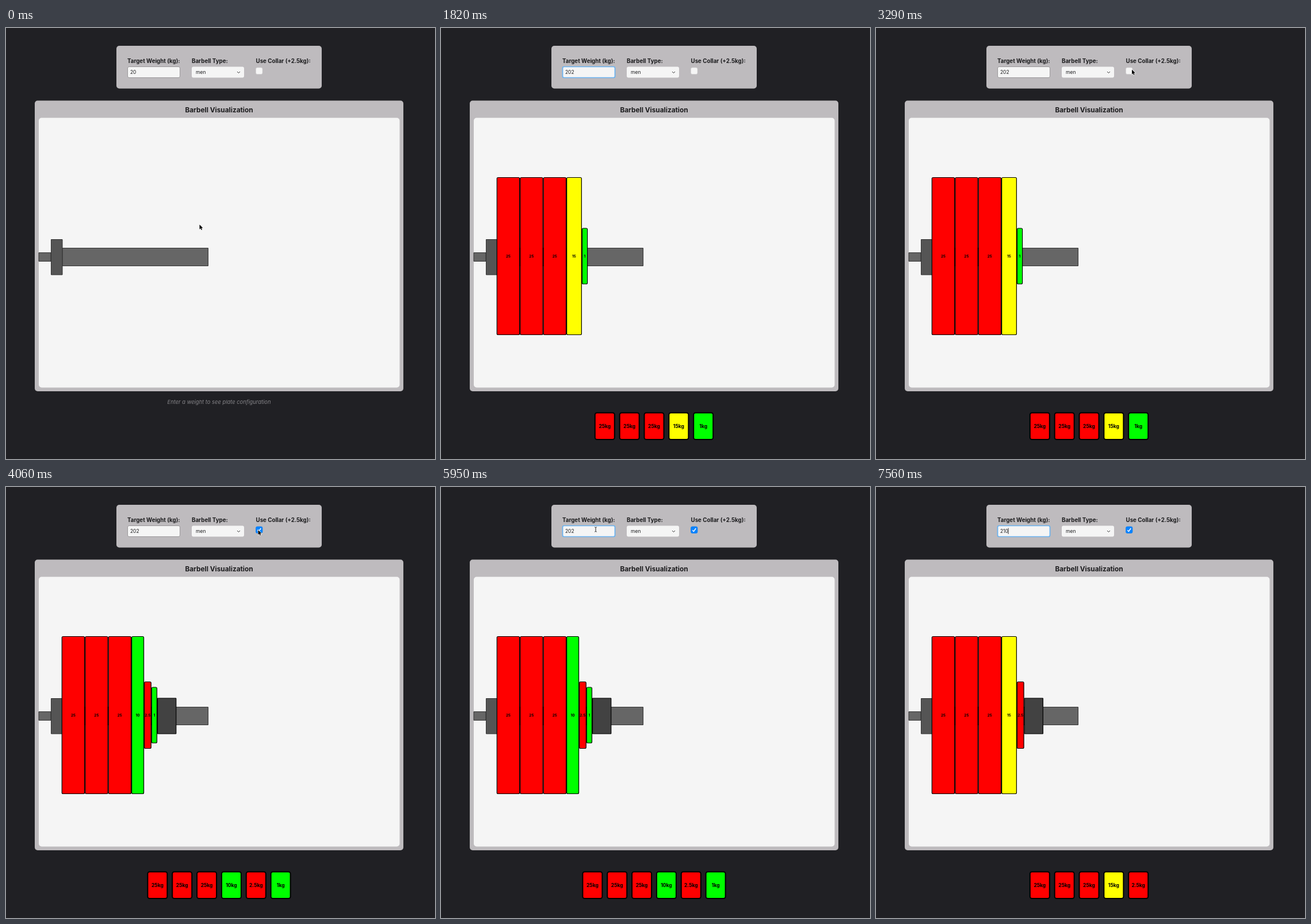
These frames come from a looping animation (746x751 px, 8 s). An HTML page with a canvas:

```html
<!DOCTYPE html>
<html lang="en">
<head>
<meta charset="utf-8">
<title>Barbell Visualization</title>
<style>
  html, body { margin: 0; width: 100%; height: 100%; overflow: hidden; background: #202024; }
  canvas { display: block; width: 746px; height: 751px; }
</style>
</head>
<body>
<canvas id="stage" width="746" height="751"></canvas>
<script>
const ctx = document.getElementById('stage').getContext('2d');
const LOOP = 8000, TICK = 70, CENTER = 370.5, AXIS = 399;

const PLATES = {
  25:  { width: 40.45, top: 260, bottom: 535, color: '#ff0000' },
  15:  { width: 26.8, top: 260, bottom: 535, color: '#ffff00' },
  10:  { width: 22, top: 260, bottom: 535, color: '#00ff00' },
  2.5: { width: 12.7, top: 339, bottom: 456, color: '#ff0000' },
  1:   { width: 10.2, top: 348.5, bottom: 446.5, color: '#00ff00' }
};

// Each entry takes effect at its time and holds until the next one.
const WEIGHT = [[0, '20'], [1050, '202'], [6160, '20'], [6300, '2'], [6370, '21'], [6510, '210']];
const COLLAR = [[0, false], [2870, true], [3290, false], [3920, true], [4270, false], [5180, true]];
const FOCUS = [[0, false], [700, true], [2870, false], [5460, true]];
const CARET = [[0, false], [770, true], [1680, false], [2240, true], [2730, false],
  [5460, true], [5950, false], [6160, true], [7000, false], [7560, true]];
const POINTER = [[0, true], [1050, false], [2030, true], [6160, false]];
const LOADED = [[0, '20'], [1750, '202'], [7070, '210']];

const PATH = [
  [0, 336.5, 342.5], [560, 269, 74], [1960, 269, 74], [2730, 445, 72.5],
  [3430, 445, 72.5], [3570, 438.5, 75], [4620, 438.5, 75], [4830, 340, 76],
  [4900, 340, 76], [5110, 439, 75], [5320, 439, 75], [5460, 269, 74]
];

const at = (steps, t) => steps.reduce((value, [start, next]) => t >= start ? next : value, null);

function pointerAt(t) {
  const i = PATH.findIndex(key => key[0] > t);
  if (i < 0) return PATH[PATH.length - 1].slice(1);
  const [t0, x0, y0] = PATH[i - 1], [t1, x1, y1] = PATH[i];
  const u = (t - t0) / (t1 - t0), e = u * u * (3 - 2 * u);
  return [x0 + (x1 - x0) * e, y0 + (y1 - y0) * e];
}

// Greedy loading of one side, heaviest plate first.
function loadSide(total, collar) {
  let rest = (total - 20 - (collar ? 5 : 0)) / 2;
  const side = [];
  for (const kg of [25, 15, 10, 2.5, 1]) {
    while (rest >= kg) { side.push(kg); rest -= kg; }
  }
  return side;
}

function box(x, y, w, h, radius, fill, stroke, line = 1) {
  ctx.beginPath();
  ctx.roundRect(x, y, w, h, radius);
  ctx.fillStyle = fill;
  ctx.fill();
  if (!stroke) return;
  ctx.strokeStyle = stroke;
  ctx.lineWidth = line;
  ctx.stroke();
}

function text(str, x, y, size, { weight = 400, color = '#1c1c1e', align = 'left', style = '' } = {}) {
  ctx.font = `${style} ${weight} ${size}px Inter, sans-serif`;
  ctx.textAlign = align;
  ctx.fillStyle = color;
  ctx.fillText(str, x, y);
}

function polyline(points, color, line) {
  ctx.beginPath();
  points.forEach(([x, y]) => ctx.lineTo(x, y));
  ctx.strokeStyle = color;
  ctx.lineWidth = line;
  ctx.stroke();
}

function drawForm(t) {
  box(192, 31, 357, 74.5, 5, '#bebbbe');
  [['Target Weight (kg):', 211], ['Barbell Type:', 323], ['Use Collar (+2.5kg):', 434.5]]
    .forEach(([label, x]) => text(label, x, 61, 9.75, { weight: 700 }));

  const focused = at(FOCUS, t);
  box(211.5, 67.5, 91, 19, 2.5, '#f5f5f5', focused ? '#68b2f0' : '#9b999b', focused ? 1.7 : 1);
  const weight = at(WEIGHT, t);
  text(weight, 216, 80, 8.4);
  if (at(CARET, t)) {
    ctx.fillRect(216 + ctx.measureText(weight).width - 0.2, 71.5, 0.9, 10.5);
  }

  box(323, 67.5, 91, 19, 3, '#f5f5f5');
  text('men', 330, 80, 8.6);
  polyline([[402, 76], [404.5, 78.5], [407, 76]], '#333', 1);

  const checked = at(COLLAR, t);
  box(434.5, 69, 11.5, 11.5, 2.5, checked ? '#0a84ff' : '#f5f5f5', checked ? '#0a7cf0' : '#d2d0d2', 0.7);
  if (checked) polyline([[437.3, 75.2], [439.4, 77.4], [443.2, 72]], '#fff', 1.5);
}

function drawBar(side, collar) {
  box(50, 126.5, 641, 506.5, 5, '#bebbbe');
  text('Barbell Visualization', CENTER, 146.7, 11.8, { weight: 700, align: 'center' });
  box(57, 156.5, 627.5, 470, 5, '#f5f5f5');

  box(57, 391.5, 21, 15, 0, '#666', '#333');
  box(98, 383.5, 253.5, 31, 0, '#666', '#333');
  box(78.5, 368.5, 19.5, 61.5, 0, '#555', '#333');

  let x = 96.7;
  for (const kg of side) {
    const { width, top, bottom, color } = PLATES[kg];
    box(x + 0.6, top + 0.5, width - 1.1, bottom - top - 1, 2, color, '#000', 1.2);
    text(kg, x + width / 2, 399.7, 6.4, { weight: 700, color: '#000', align: 'center' });
    x += width;
  }
  if (collar && side.length) box(x + 0.6, AXIS - 31, 32.2, 62, 0.5, '#424242', '#000', 1.2);
}

function drawSummary(side) {
  if (!side.length) {
    text('Enter a weight to see plate configuration', CENTER, 654.5, 9.4,
      { color: '#858488', align: 'center', style: 'italic' });
    return;
  }
  const pitch = 42.85, width = 36;
  const left = CENTER - ((side.length - 1) * pitch + width) / 2;
  side.forEach((kg, i) => {
    const x = left + i * pitch;
    box(x + 1, 670.5, width - 2, 46.5, 3.5, PLATES[kg].color, '#000', 2);
    text(kg + 'kg', x + width / 2, 697, 8.5, { weight: 700, color: '#000', align: 'center' });
  });
}

function drawPointer(t) {
  if (!at(POINTER, t)) return;
  const [x, y] = pointerAt(t);
  ctx.save();
  ctx.translate(x, y);
  if (x > 211 && x < 303 && y > 67 && y < 87) {
    polyline([[0, -3.5], [0, 3.5]], '#222', 1);
    for (const s of [-1, 1]) polyline([[-2, 4.3 * s], [0, 3.4 * s], [2, 4.3 * s]], '#222', 0.8);
  } else {
    ctx.beginPath();
    [[0, 0], [0, 8.4], [1.9, 6.6], [3.2, 9.6], [4.6, 9], [3.3, 6.1], [6, 6]]
      .forEach(([px, py]) => ctx.lineTo(px, py));
    ctx.closePath();
    ctx.strokeStyle = '#fff';
    ctx.lineWidth = 1.2;
    ctx.stroke();
    ctx.fillStyle = '#000';
    ctx.fill();
  }
  ctx.restore();
}

function render(now) {
  const t = Math.floor((now % LOOP) / TICK) * TICK;
  const collar = at(COLLAR, t);
  const side = loadSide(Number(at(LOADED, t)), collar);
  ctx.fillStyle = '#202024';
  ctx.fillRect(0, 0, 746, 751);
  drawForm(t);
  drawBar(side, collar);
  drawSummary(side);
  drawPointer(t);
}

const start = performance.now();
function frame() {
  render(performance.now() - start);
  requestAnimationFrame(frame);
}
frame();
</script>
</body>
</html>
```
